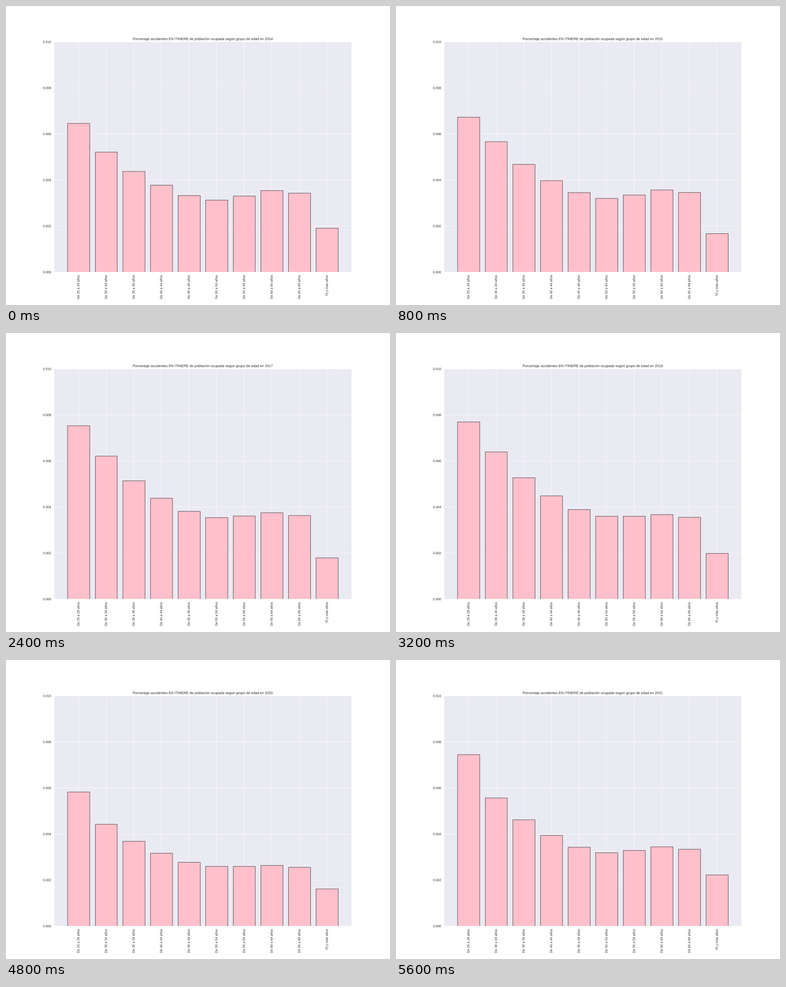
A matplotlib script that plays this animation: 849x660 px, repeating every 6.4 s.

```python
import matplotlib.pyplot as plt
import numpy as np
from matplotlib.animation import FuncAnimation
from matplotlib.patheffects import Normal

WIDTH, HEIGHT, DPI = 849, 660, 48
PT = WIDTH / 18 / DPI  # the chart is laid out as an 18 inch wide figure
INK = "0.15"
X_MIN, X_MAX = -0.89, 9.89

AGES = [f"De {a} a {a + 4} años" for a in range(25, 70, 5)] + ["70 y más años"]
GROUPS = np.arange(len(AGES))
YEARS = range(2014, 2022)

# Typical accidents per thousand workers in each age group
PROFILE = np.array([7.53, 6.21, 5.14, 4.38, 3.81, 3.54, 3.61, 3.75, 3.63, 1.795])

# Level against the profile at a few ages; the rest is interpolated
KEY_GROUPS = [0, 1, 5, 7.5, 9]
LEVELS = {
    2014: [0.858, 0.840, 0.884, 0.945, 1.062],
    2015: [0.894, 0.912, 0.904, 0.952, 0.929],
    2017: [1, 1, 1, 1, 1],
    2019: [1.045, 1.058, 1.035, 0.957, 1.212],
    2020: [0.774, 0.712, 0.732, 0.703, 0.901],
    2021: [0.989, 0.897, 0.901, 0.919, 1.240],
}


def rates(year):
    keys = [np.interp(year, list(LEVELS), column) for column in zip(*LEVELS.values())]
    keys.insert(4, keys[3])
    ages = [0, 1, 5, 7, 8, 9]
    return PROFILE * np.interp(GROUPS, ages, keys) / 1000


def snap(x):
    """Move x to the nearest pixel centre of the chart at 100 dpi."""
    left, scale = 225, 1395 / (X_MAX - X_MIN)
    pixel = np.floor(left + (x - X_MIN) * scale + 0.5) + 0.5
    return (pixel - left) / scale + X_MIN


plt.rcParams.update({
    "font.family": "Liberation Sans",
    "text.hinting": "none",
    "path.snap": False,
    "axes.axisbelow": True,
})

fig = plt.figure(figsize=(WIDTH / DPI, HEIGHT / DPI), dpi=DPI, facecolor="white")
ax = fig.add_axes([0.125, 0.11, 0.775, 0.77], facecolor="#EAEAF2")
left, right = snap(GROUPS - 0.4), snap(GROUPS + 0.4)
bars = ax.bar(left, rates(YEARS[0]), width=right - left, align="edge",
              color="pink", edgecolor="black", linewidth=PT)

ax.set_xlim(X_MIN, X_MAX)
ax.set_ylim(0, 0.01)
ax.set_xticks(GROUPS, AGES, rotation=90)
ax.set_yticks(np.arange(6) * 0.002)
ax.yaxis.set_major_formatter("{x:.3f}")
ax.tick_params(length=0, pad=9.5 * PT, labelsize=11 * PT, labelcolor=INK)
ax.grid(color="white", linewidth=PT)
for spine in ax.spines.values():
    spine.set(color="white", linewidth=1.25 * PT)
title = ax.set_title("", fontsize=12 * PT, pad=6 * PT, color=INK)

# Drawing text as outlines keeps its sub-pixel position
for text in [title, *ax.get_xticklabels(), *ax.get_yticklabels()]:
    text.set_path_effects([Normal()])


def show_year(i):
    year = YEARS[i]
    for bar, rate in zip(bars, rates(year)):
        bar.set_height(rate)
    title.set_text("Porcentaje accidentes EN ITINERE de población ocupada "
                   f"según grupo de edad en {year}")
    return [*bars, title]


anim = FuncAnimation(fig, show_year, frames=len(YEARS), interval=800,
                     repeat=True, repeat_delay=0, blit=False)
plt.show()
```
